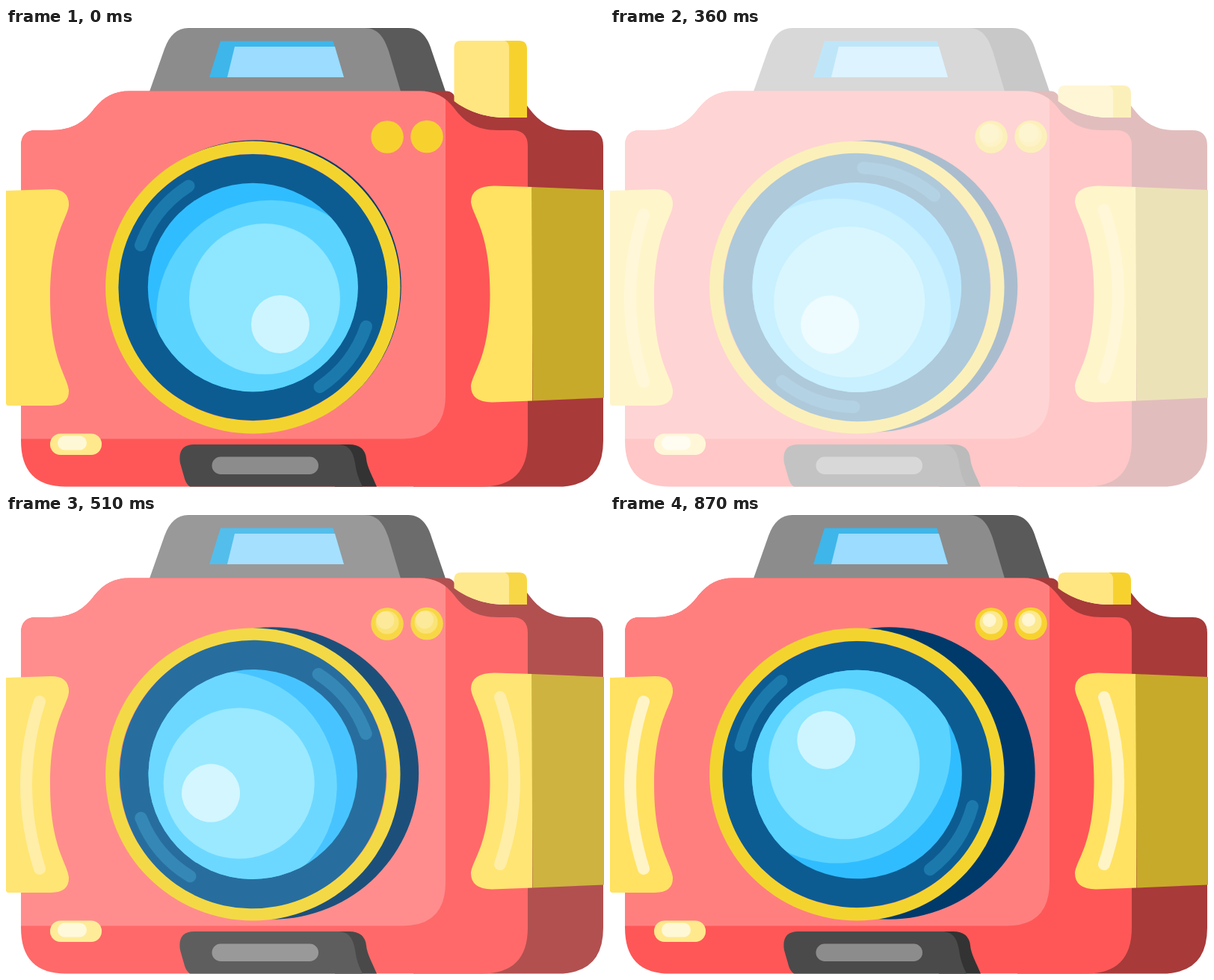
An HTML page that plays this animation: 800x615 px, repeating every 0.9 s.

```html
<!DOCTYPE html>
<html lang="en">
<head>
<meta charset="utf-8">
<title>Camera</title>
<style>
html, body { margin: 0; width: 100%; height: 100%; overflow: hidden; background: #fff; }
svg { display: block; width: 100%; height: 100%; }
</style>
</head>
<body>
<svg viewBox="0 0 800 615" xmlns="http://www.w3.org/2000/svg">
  <defs>
    <path id="front" d="M20 158Q20 137 40 137H60C90 137 105 125 118 108C131 92 145 84.500 165 84.500H553C573 84.500 588 92 600 108C613 125 628 137 658 137H677Q698 137 698 158V553Q698 614.500 637 614.500H80Q20 614.500 20 553Z"/>
    <clipPath id="frontClip"><use href="#front"/></clipPath>
    <clipPath id="lensClip"><ellipse rx="140.500" ry="139.700"/></clipPath>
  </defs>

  <!-- viewfinder -->
  <path fill="#5a5a5a" d="M470 0H538C558 0 566 18 570 32L588 85H500Z"/>
  <path fill="#8c8c8c" d="M192 85L212 28Q222 0 244 0H480C500 0 507 17 512 31L528 85Z"/>
  <path fill="#3eb6ea" d="M287 17.500H437.500L452 66H272Z"/>
  <path fill="#9bdcff" d="M306 25H440L452 66H296Z"/>

  <!-- body -->
  <path fill="#a83a3a" d="M545 84.500H590Q598 85 601 93V98C615 110 640 120 667 120H697V104C710 122 726 137 755 137H779Q799 137 799 158V553Q799 614.500 738 614.500H545Z"/>
  <path id="shutter" fill="#ffe680"/>
  <path id="shutterSide" fill="#f7d22f"/>
  <use href="#front" fill="#ff5757"/>
  <path clip-path="url(#frontClip)" fill="#ff7f7f" d="M0 80H588V492Q588 550.500 530 550.500H0Z"/>

  <!-- grips -->
  <path fill="#ffe262" d="M0 218L60 216Q85 216 84 238C82 256 59 277 59 361C59 445 82 466 84 485Q85 506 60 506H2L0 504Z"/>
  <path fill="#ffe262" d="M704 213L653 211.500Q622 212 622 233C624 252 647.500 272 647.500 357C647.500 441 624 461 622 480Q622 501 650 501.500L704 499.500Z"/>
  <path fill="#c8aa2a" d="M703 213L800 217V495.500L704.500 499.500Z"/>
  <g id="gripShine" fill="none" stroke="#fff4c6" stroke-width="16" stroke-linecap="round">
    <path d="M45 250Q9 361 45 474"/>
    <path d="M661 244Q699 356 661 468"/>
  </g>

  <!-- knobs -->
  <g fill="#f7d22f"><circle cx="510" cy="146" r="21.800"/><circle cx="563" cy="145.500" r="21.800"/></g>
  <g id="knobShine">
    <g fill="#fce98f"><circle cx="510" cy="144" r="15.500"/><circle cx="562" cy="143.500" r="15.500"/></g>
    <g fill="#fff6d2"><circle class="spark" cx="507.500" cy="141"/><circle class="spark" cx="560" cy="140.500"/></g>
  </g>

  <!-- lamp and base plate -->
  <rect x="59" y="543.500" width="69" height="28.500" rx="14" fill="#ffe98c"/>
  <rect x="69" y="546.500" width="39" height="19" rx="9.500" fill="#fff8d6"/>
  <path fill="#333" d="M430 558H459Q480 558 482 577C483 588 490 600 496 614.500H440Z"/>
  <path fill="#4a4a4a" d="M252 558H443C459 558 464 567 467 583Q469 600 477 614.500H246Q241 611 239 604L233 583Q229 558 252 558Z"/>
  <rect x="275.500" y="574.500" width="142.500" height="23.500" rx="11.700" fill="#8c8c8c"/>

  <!-- lens -->
  <circle id="shadow" cy="346" r="195.700" fill="#003a6b"/>
  <g transform="translate(330.300 347.500)">
    <ellipse rx="197.200" ry="196" fill="#f3d42f"/>
    <ellipse rx="179.300" ry="178.800" fill="#ff7f7f"/>
    <g id="lens">
      <ellipse rx="179.900" ry="178.400" fill="#0c5c92"/>
      <ellipse rx="140.500" ry="139.700" fill="#30bdff"/>
      <circle cx="24.200" cy="36.400" r="153.200" fill="#5bd3ff" clip-path="url(#lensClip)"/>
      <circle cx="15.700" cy="15.600" r="101" fill="#8ee6ff"/>
      <circle cx="36.700" cy="49.500" r="39" fill="#cdf5ff"/>
      <g fill="none" stroke="#1c79ac" stroke-width="16.500" stroke-linecap="round">
        <path id="glint" d="M151.500 52.500A160.500 160.500 0 0 1 89.500 133.500"/>
        <use href="#glint" transform="rotate(181.500)"/>
      </g>
    </g>
  </g>

  <rect id="flash" width="800" height="615" fill="#fff"/>
</svg>
<script>
const LOOP = 900, STEP = 30, LAST = LOOP / STEP - 1;
const get = id => document.getElementById(id);
const set = (id, name, value) => get(id).setAttribute(name, value);
const sparks = document.querySelectorAll('.spark');

function pressShutter(y) {
  set('shutter', 'd', `M599.5 ${y + 9}Q599.5 ${y} 609 ${y}H680V120H667C640 120 615 110 599.5 98Z`);
  set('shutterSide', 'd', `M667 ${y}H686Q697 ${y} 697 ${y + 11}V120H673V${y + 9}Q673 ${y + 2} 667 ${y}Z`);
}

function draw(time) {
  const n = Math.floor((time % LOOP) / STEP);
  const p = n / LAST;
  set('lens', 'transform', `rotate(${n * 6.03})`);
  set('shadow', 'cx', 333 + 40 * p);
  pressShutter(17 + 5 * Math.min(n, 12));
  set('gripShine', 'opacity', p);
  set('knobShine', 'opacity', p);
  sparks.forEach(s => s.setAttribute('r', 16 - 7 * p));
  // the flash fires at once, then fades evenly
  set('flash', 'opacity', n < 9 ? 0 : Math.max(0, (18 - n) / 9));
}

function tick() {
  draw(performance.now());
  requestAnimationFrame(tick);
}
tick();
</script>
</body>
</html>
```
